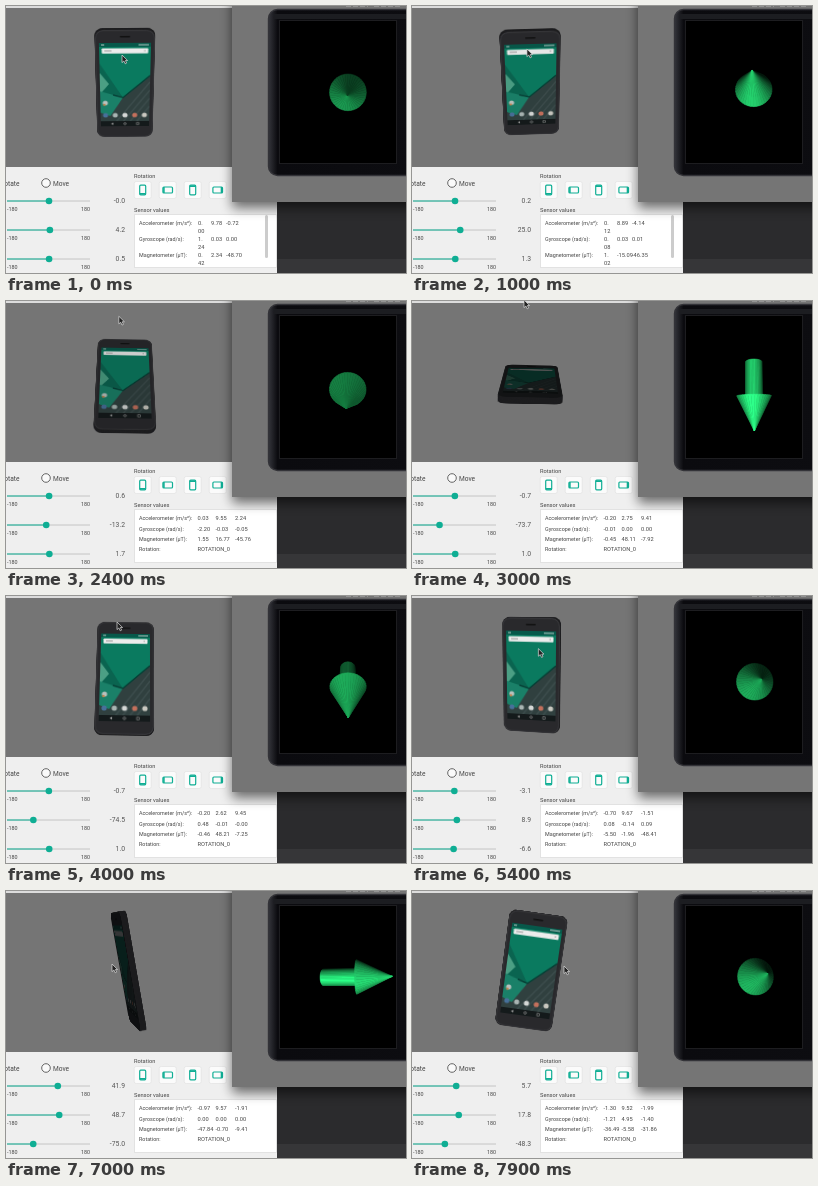
Recreate the animation shown at these times as an HTML page with a canvas. Size 400 by 267 pixels, loop 8000 ms.

```html
<!DOCTYPE html>
<html lang="en">
<head>
<meta charset="utf-8">
<title>Sensor playground</title>
<style>
  html, body { margin: 0; width: 100%; height: 100%; overflow: hidden; background: #757575; }
  #stage { position: relative; width: 400px; height: 267px; overflow: hidden; }
  #stage > * { position: absolute; left: 0; top: 0; }
  svg { display: block; }
  text { font-family: Roboto, "Open Sans", sans-serif; font-size: 5.7px; fill: #444; white-space: pre; }
  .large { font-size: 6.6px; }
  .small { font-size: 5.4px; }
  .angle { font-size: 6.8px; text-anchor: end; fill: #555; }
  #scene { width: 226px; height: 161px; overflow: hidden; perspective: 450px; perspective-origin: 119px 80px; }
  #phone { position: absolute; left: -29px; top: -58.5px; width: 58px; height: 117px; transform-style: preserve-3d; }
  #phone > * { position: absolute; inset: 0; width: 58px; height: 117px; border-radius: 8px; }
  .slab { background: #1b1b1d; }
  #arrow { left: 274px; top: 15px; width: 117px; height: 143px; }
</style>
</head>
<body>
<div id="stage">
  <svg width="400" height="267">
    <rect width="400" height="267" fill="#757575"/>
    <rect width="400" height="2" fill="#dcdcdc"/>
    <rect y="161" width="272" height="106" fill="#efefef"/>
    <rect x="271" y="161" width="129" height="106" fill="#2b2b2d"/>
    <rect x="271" y="253" width="129" height="14" fill="#363638"/>

    <text x="13.5" y="179.5" text-anchor="end" class="large">Rotate</text>
    <circle cx="40" cy="177" r="4.3" fill="#fafafa" stroke="#555" stroke-width=".9"/>
    <text x="47" y="179.5" class="large">Move</text>
    <g id="sliders"></g>

    <text x="128" y="172">Rotation</text>
    <g id="buttons"></g>
    <text x="128" y="205.7">Sensor values</text>
    <rect x="128.5" y="208.5" width="142" height="53" fill="#fff" stroke="#e2e2e2"/>
    <g id="readout"></g>
  </svg>

  <div id="scene">
    <div id="phone">
      <svg id="face" viewBox="0 0 58 117">
        <defs><clipPath id="screen"><rect x="4" y="13" width="50" height="91"/></clipPath></defs>
        <rect width="58" height="117" rx="8" fill="#29292c"/>
        <rect x=".7" y=".7" width="56.6" height="115.6" rx="7.4" fill="none" stroke="#3d3d41" stroke-width=".8"/>
        <rect x="24" y="6" width="10" height="1.4" rx=".7" fill="#111"/>
        <g clip-path="url(#screen)">
          <rect x="4" y="13" width="50" height="91" fill="#0a7a5f"/>
          <path d="M4 34L27 71 4 90Z" fill="#0a6450"/>
          <path d="M4 44L13 56 4 67Z" fill="#4b9f84"/>
          <path d="M54 47L27 71 4 76V104H54Z" fill="#30403f"/>
          <path d="M4 64L27 71 14 92 4 88Z" fill="#1a8068"/>
          <path id="stripes" stroke="#3c4c4c" stroke-width="1.5"/>
          <path d="M54 47L27 71 17 68" fill="none" stroke="#063f35" stroke-width="1.4"/>
          <rect x="4" y="13" width="50" height="4" fill="#07584a"/>
          <path d="M42 15H52M6 15H9" stroke="#b5ccc6" stroke-width="1"/>
          <rect x="6.5" y="18.5" width="45" height="5.2" rx=".8" fill="#ececec"/>
          <path d="M9 21H16M47.5 21H49" stroke="#999" stroke-width="1.2"/>
          <g id="apps"></g>
          <rect x="4" y="98" width="50" height="6" fill="#141a1b"/>
          <path d="M17 99.5L14.5 101 17 102.5Z" fill="#999"/>
          <circle cx="29" cy="101" r="1.3" fill="none" stroke="#999" stroke-width=".6"/>
          <rect x="41" y="99.8" width="2.4" height="2.4" fill="none" stroke="#999" stroke-width=".6"/>
        </g>
        <rect id="shade" width="58" height="117" rx="8" fill="#08090a"/>
      </svg>
    </div>
  </div>

  <svg width="400" height="267">
    <defs>
      <filter id="blur" x="-20%" y="-20%" width="140%" height="140%"><feGaussianBlur stdDeviation="6"/></filter>
      <linearGradient id="body">
        <stop offset="0" stop-color="#34353b"/><stop offset=".06" stop-color="#0b0b0f"/><stop offset="1" stop-color="#0d0d11"/>
      </linearGradient>
    </defs>
    <path id="cursor" d="M0 0V7.6L1.9 6 3.2 8.8 4.6 8.1 3.4 5.5H5.6Z" fill="#222" stroke="#ddd" stroke-width=".7"/>
    <rect x="226" y="-20" width="190" height="222" fill="#000" opacity=".55" filter="url(#blur)"/>
    <rect x="226" y="-4" width="180" height="200" fill="#757575"/>
    <path d="M340 .4H362M368 .4H395" stroke="#999" stroke-dasharray="5 2"/>
    <rect x="262.5" y="3.5" width="150" height="166" rx="9" fill="url(#body)" stroke="#333338" stroke-width="1.4"/>
    <rect x="268" y="8" width="132" height="5" fill="#1c1d21"/>
    <rect x="273.5" y="14.5" width="117" height="143" fill="#000" stroke="#1d1d20"/>
  </svg>
  <canvas id="arrow"></canvas>
</div>

<script>
const LOOP = 8000, STEP = 100, REFRESH = 600, LAG = 200, TEAL = '#0fae94', RAD = Math.PI / 180;
const $ = id => document.getElementById(id);

// keys: [time, ...values], eased in between
function track(keys, t) {
  const i = keys.findIndex(k => k[0] > t);
  if (i < 0) return keys.at(-1).slice(1);
  const a = keys[Math.max(0, i - 1)], b = keys[i];
  const k = Math.max(0, (t - a[0]) / (b[0] - a[0])) || 0, eased = k * k * (3 - 2 * k);
  return a.map((v, j) => v + (b[j] - v) * eased).slice(1);
}

// time, roll, pitch, yaw in degrees
const turned = [41.9, 48.7, -75];
const poseKeys = [
  [-200, -.01, 4.2, .5], [0, 0, 24, 1], [1600, 1.1, 30.2, 3], [1900, 1, 8, 2],
  [2800, -.7, -73.7, 1], [3400, -.7, -74.5, 1], [4000, -.8, -16, 0], [5200, -3.1, 8.9, -6.6],
  [6400, ...turned], [7000, ...turned], [7600, 5.7, 17.8, -48.3], [7750, -8, 6, 0]
];
const cursorKeys = [
  [0, 116, 49], [1900, 114, 38], [2800, 112, -1], [3400, 112, -1], [4000, 111, 26],
  [5200, 128, 51], [6400, 106, 73], [7000, 106, 73], [7900, 152, 75]
];
const pose = t => track(poseKeys, t);

const GRAVITY = [0, 9.81, 0], MAGNETIC = [0, 5.9, -48.4];

// turns a world vector into the phone's own axes
function toDevice([x, y, z], angles) {
  const spin = (a, b, deg) => {
    const c = Math.cos(deg * RAD), s = Math.sin(deg * RAD);
    return [a * c + b * s, b * c - a * s];
  };
  const [roll, pitch, yaw] = angles;
  [y, z] = spin(y, z, pitch);
  [z, x] = spin(z, x, yaw);
  [x, y] = spin(x, y, roll);
  return [x, y, z];
}

function gyroscope(t) {
  const dt = 60, now = pose(t), next = pose(t + dt);
  return [1, 2, 0].map(i => (next[i] - now[i]) * RAD * 1000 / dt);
}

const label = (x, y, s, cls = '') => `<text x="${x}" y="${y}" class="${cls}">${s}</text>`;

function drawSliders(angles) {
  $('sliders').innerHTML = angles.map((v, i) => {
    const y = 195 + i * 29, x = 43 + v * .21;
    return `<path d="M1 ${y}H84" stroke="#c4c4c4"/><path d="M1 ${y}H${x}" stroke="${TEAL}"/>` +
      `<circle cx="${x}" cy="${y}" r="3.3" fill="${TEAL}"/>` +
      label(1, y + 10.3, '-180', 'small') + label(75, y + 10.3, '180', 'small') +
      label(119, y + 1.5, v.toFixed(1), 'angle');
  }).join('');
}

function drawReadout(sensors, wrapped) {
  let out = Object.entries(sensors).map(([name, values], i) => {
    const [a, b, c] = values.map(v => v.toFixed(2));
    const y = 219.3 + i * (wrapped ? 16 : 10.3), dot = a.indexOf('.') + 1;
    return label(133, y, name, 'small') + (wrapped
      ? label(192, y, a.slice(0, dot)) + label(192, y + 7.5, a.slice(dot)) + label(205, y, b) + label(220, y, c)
      : label(191.5, y, a) + label(209.5, y, b) + label(229, y, c));
  }).join('');
  out += wrapped
    ? '<rect x="259" y="209" width="3" height="43" rx="1.5" fill="#ccc"/>'
    : label(133, 250.2, 'Rotation:', 'small') + label(191.5, 250.2, 'ROTATION_0');
  $('readout').innerHTML = out;
}

function drawPhone([roll, pitch, yaw]) {
  const tilt = Math.cos(pitch * RAD), facing = tilt * Math.cos(yaw * RAD);
  $('phone').style.transform =
    `translate(119px,${77 + 3 * tilt}px) rotateX(${-pitch}deg) rotateY(${yaw}deg) rotateZ(${-roll}deg)`;
  $('shade').setAttribute('opacity', Math.min(.82, Math.max(0, (.9 - facing) * 1.1)));
}

const canvas = $('arrow'), ctx = canvas.getContext('2d'), ratio = window.devicePixelRatio || 1;
canvas.width = 117 * ratio;
canvas.height = 143 * ratio;

// axes: right, down, towards the viewer
function drawArrow(dir) {
  const EYE = 120, SIDES = 40, TAIL = -26, NECK = 9, TIP = 42, THIN = 8.5, WIDE = 17;
  const dot = (a, b) => a[0] * b[0] + a[1] * b[1] + a[2] * b[2];
  const unit = v => v.map(c => c / Math.hypot(...v));
  const cross = (a, b) => [a[1] * b[2] - a[2] * b[1], a[2] * b[0] - a[0] * b[2], a[0] * b[1] - a[1] * b[0]];
  const d = unit(dir), u = unit(cross(d, Math.abs(d[0]) > .7 ? [0, 1, 0] : [1, 0, 0])), w = cross(d, u);
  const light = unit([-.12, .3, 1]), back = d.map(c => -c);
  const at = (h, r, a) => d.map((c, i) => c * h + r * (u[i] * Math.cos(a) + w[i] * Math.sin(a)));
  const faces = [];
  const add = (normal, ...points) => {
    const n = unit(normal), p = points[0];
    if (dot(n, [-p[0], -p[1], EYE - p[2]]) <= 0) return;
    const lit = Math.max(0, dot(n, light));
    faces.push({ points, lit, z: points.reduce((s, q) => s + q[2], 0) / points.length });
  };
  for (let i = 0; i < SIDES; i++) {
    const [a, m, b] = [i, i + .5, i + 1].map(k => k / SIDES * 2 * Math.PI);
    add(at(0, 1, m), at(TAIL, THIN, a), at(TAIL, THIN, b), at(NECK, THIN, b), at(NECK, THIN, a));
    add(back, at(TAIL, 0, 0), at(TAIL, THIN, a), at(TAIL, THIN, b));
    add(back, at(NECK, THIN, a), at(NECK, WIDE, a), at(NECK, WIDE, b), at(NECK, THIN, b));
    add(at(.5, 1, m), at(NECK, WIDE, a), at(NECK, WIDE, b), at(TIP, 0, 0));
  }
  faces.sort((p, q) => p.z - q.z);
  ctx.setTransform(ratio, 0, 0, ratio, 0, 0);
  ctx.clearRect(0, 0, 117, 143);
  ctx.translate(68, 71);
  ctx.lineWidth = .5;
  for (const f of faces) {
    const k = .1 + .8 * f.lit + .2 * f.lit ** 12;
    ctx.fillStyle = ctx.strokeStyle = `rgb(${42 * k},${240 * k},${126 * k})`;
    ctx.beginPath();
    for (const [x, y, z] of f.points) {
      const near = EYE / (EYE - z);
      ctx.lineTo(x * near, y * near);
    }
    ctx.closePath();
    ctx.fill();
    ctx.stroke();
  }
}

function build() {
  for (let z = 1; z <= 6; z++) {
    const slab = document.createElement('div');
    slab.className = 'slab';
    slab.style.transform = `translateZ(${-z}px)`;
    $('phone').prepend(slab);
  }
  $('stripes').setAttribute('d', [0, 1, 2, 3].map(i => `M54 ${54 + i * 9}L${16 + i * 7} 104`).join(''));
  const dot = (x, y, fill, r = 2.6) => `<circle cx="${x}" cy="${y}" r="${r}" fill="${fill}"/>`;
  $('apps').innerHTML = ['#47709a', '#a9b5b3', '#d5d8d6', '#c4705c', '#c9c8c0']
    .map((c, i) => dot(9 + i * 10, 91, c)).join('') +
    dot(9, 77, '#b9c2be') + dot(8, 79, '#c2844f', 1.3);
  $('buttons').innerHTML = [0, 1, 2, 3].map(i =>
    `<g transform="translate(${136.7 + i * 25} 184)">
      <rect x="-8.5" y="-8.5" width="17" height="17" rx="2" fill="#fbfbfb" stroke="#e0e0e0" stroke-width=".6"/>
      <g transform="rotate(${i * 90})" fill="none" stroke="${TEAL}">
        <rect x="-3" y="-4.8" width="6" height="9.6" rx="1" stroke-width="1.2"/>
        <path d="M-3 3.8H3" stroke-width="1.6"/></g></g>`).join('');
}

function render(t) {
  const sampled = Math.floor(t / REFRESH) * REFRESH - LAG, angles = pose(sampled);
  drawSliders(angles);
  drawReadout({
    'Accelerometer (m/s²):': toDevice(GRAVITY, angles),
    'Gyroscope (rad/s):': gyroscope(sampled),
    'Magnetometer (μT):': toDevice(MAGNETIC, angles)
  }, t < 1400);
  drawPhone(pose(t));
  const [x, y, z] = toDevice(MAGNETIC, pose(t - LAG));
  drawArrow([-x, y, -z]);
  $('cursor').setAttribute('transform', `translate(${track(cursorKeys, t)})`);
}

let shown = -1;
function tick() {
  const t = Math.floor(performance.now() % LOOP / STEP) * STEP;
  if (t !== shown) render(shown = t);
  requestAnimationFrame(tick);
}
build();
tick();
</script>
</body>
</html>
```
